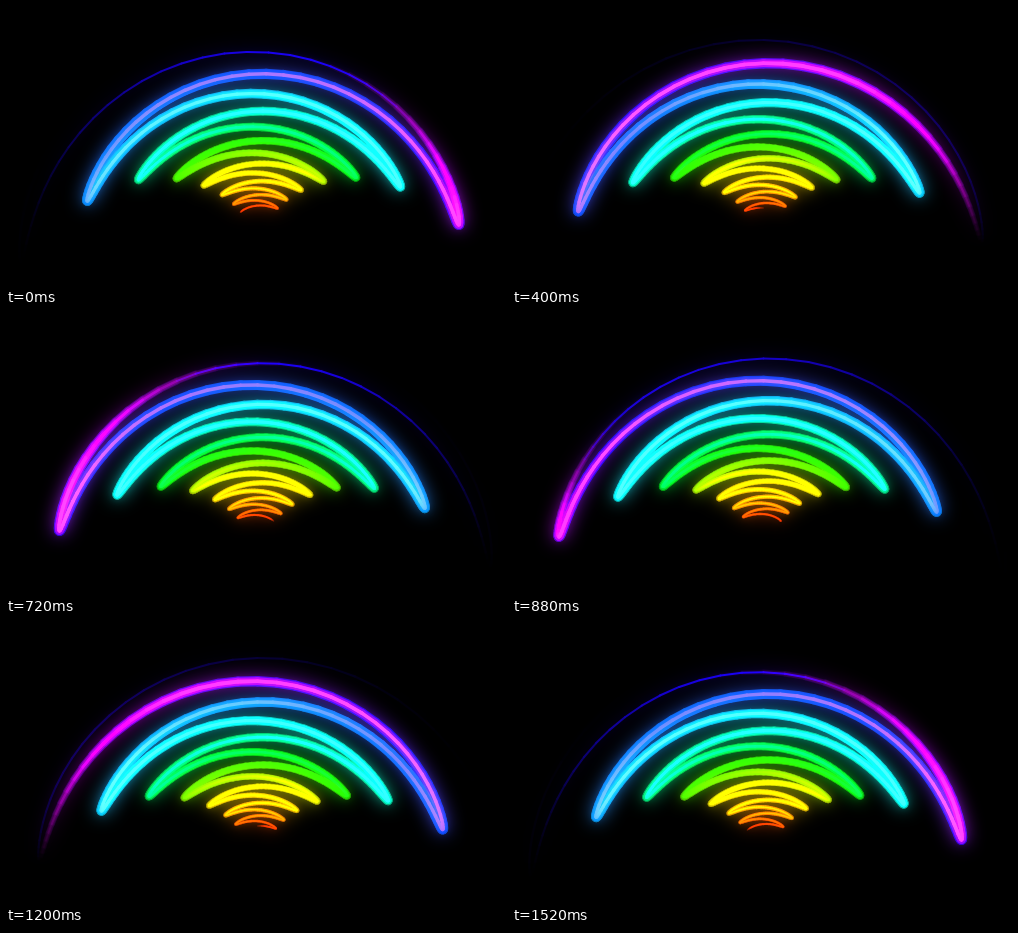
An HTML page with a canvas for the animation above (1600 ms loop, 500 by 281 pixels).

```html
<!DOCTYPE html>
<html lang="en">
<head>
<meta charset="utf-8">
<title>Neon swing</title>
<style>
html, body { margin: 0; width: 100%; height: 100%; overflow: hidden; background: #000; }
canvas { display: block; width: 100vw; height: 100vh; }
</style>
</head>
<body>
<canvas id="stage" width="500" height="281"></canvas>
<script>
const W = 500, H = 281, LOOP = 1600, STEP = 80, CX = 251.5;
const V_MAX = 7.15, DV = 1 / 90;

// Colour along the strand: [turn, hue]
const HUES = [[0, 10], [2, 46], [3, 57], [5.5, 188], [6, 222], [6.5, 295]];
const TAIL_HUE = 246;

const ctx = document.getElementById('stage').getContext('2d');
const layer = document.createElement('canvas');
layer.width = W;
layer.height = H;
const pen = layer.getContext('2d');
pen.lineCap = 'round';

const cubic = (a, b, c, d, v) => a + v * (b + v * (c + v * d));

function smooth(lo, hi, x) {
  const k = Math.max(0, Math.min(1, (x - lo) / (hi - lo)));
  return k * k * (3 - 2 * k);
}

function hueAt(v) {
  const i = HUES.findIndex(([stop]) => stop > v);
  if (i < 0) return HUES[HUES.length - 1][1];
  if (i === 0) return HUES[0][1];
  const [v0, h0] = HUES[i - 1], [v1, h1] = HUES[i];
  return h0 + (h1 - h0) * (v - v0) / (v1 - v0);
}

// Blue hues are lifted so that they glow as strongly as green ones.
function colour(hue, light) {
  const lift = 1 + 0.35 * Math.max(0, -Math.cos((hue - 60) * Math.PI / 180));
  return `hsl(${hue}, 100%, ${light * lift}%)`;
}

// Turn v swings like a pendulum along a circular arc that widens with v.
function pointAt(v, phase) {
  const reach = cubic(17, 5.25, 1.31, 0.344, v);
  const top = cubic(202, -9.42, -0.62, -0.209, v);
  const swing = 2 * Math.atan(cubic(0.265, 0, 0, 0.00196, v));
  const radius = reach / Math.sin(swing);
  const angle = swing * Math.cos(2 * Math.PI * (v - phase));
  return {
    x: CX - radius * Math.sin(angle),
    y: top + radius * (1 - Math.cos(angle))
  };
}

// style(v) gives the stroke colour and width
function strand(phase, from, to, style) {
  let prev = pointAt(from, phase);
  for (let v = from + DV; v <= to; v += DV) {
    const next = pointAt(v, phase);
    [pen.strokeStyle, pen.lineWidth] = style(v);
    pen.beginPath();
    pen.moveTo(prev.x, prev.y);
    pen.lineTo(next.x, next.y);
    pen.stroke();
    prev = next;
  }
}

// One tube layer; lag takes its hue from further in.
function tube(phase, scale, light, lag) {
  strand(phase, 0, 6.8, v => {
    const glow = smooth(-0.04, 0.1, v) * (1 - smooth(6.54, 6.75, v));
    const width = (1.8 + 1.25 * v) * scale * (0.4 + 0.6 * glow);
    return [colour(hueAt(v - lag), light * glow), width];
  });
}

// Thin afterglow, faint where the swing slows down
function tail(phase) {
  strand(phase, 6.6, V_MAX, v => {
    const speed = Math.sin(2 * Math.PI * (v - phase)) ** 2;
    const fade = smooth(6.6, 6.7, v) * (1 - smooth(6.65, V_MAX, v));
    return [colour(TAIL_HUE, 34 * speed * fade), 2];
  });
}

function bloom(radius, alpha) {
  ctx.filter = radius ? `blur(${radius}px)` : 'none';
  ctx.globalAlpha = alpha;
  ctx.drawImage(layer, 0, 0);
}

function draw(phase) {
  pen.clearRect(0, 0, W, H);
  pen.globalCompositeOperation = 'lighten';
  tail(phase);
  tube(phase, 1.05, 22, 0.3);
  tube(phase, 0.78, 33, 0.15);
  tube(phase, 0.36, 50, 0);

  ctx.globalCompositeOperation = 'source-over';
  ctx.globalAlpha = 1;
  ctx.filter = 'none';
  ctx.fillStyle = '#000';
  ctx.fillRect(0, 0, W, H);
  ctx.globalCompositeOperation = 'lighter';
  bloom(9, 0.75);
  bloom(3, 0.2);
  bloom(0, 1);
}

let shown = -1;
function tick() {
  const step = Math.floor(performance.now() % LOOP / STEP);
  if (step !== shown) {
    shown = step;
    draw(step * STEP / LOOP);
  }
  requestAnimationFrame(tick);
}
tick();
</script>
</body>
</html>
```
